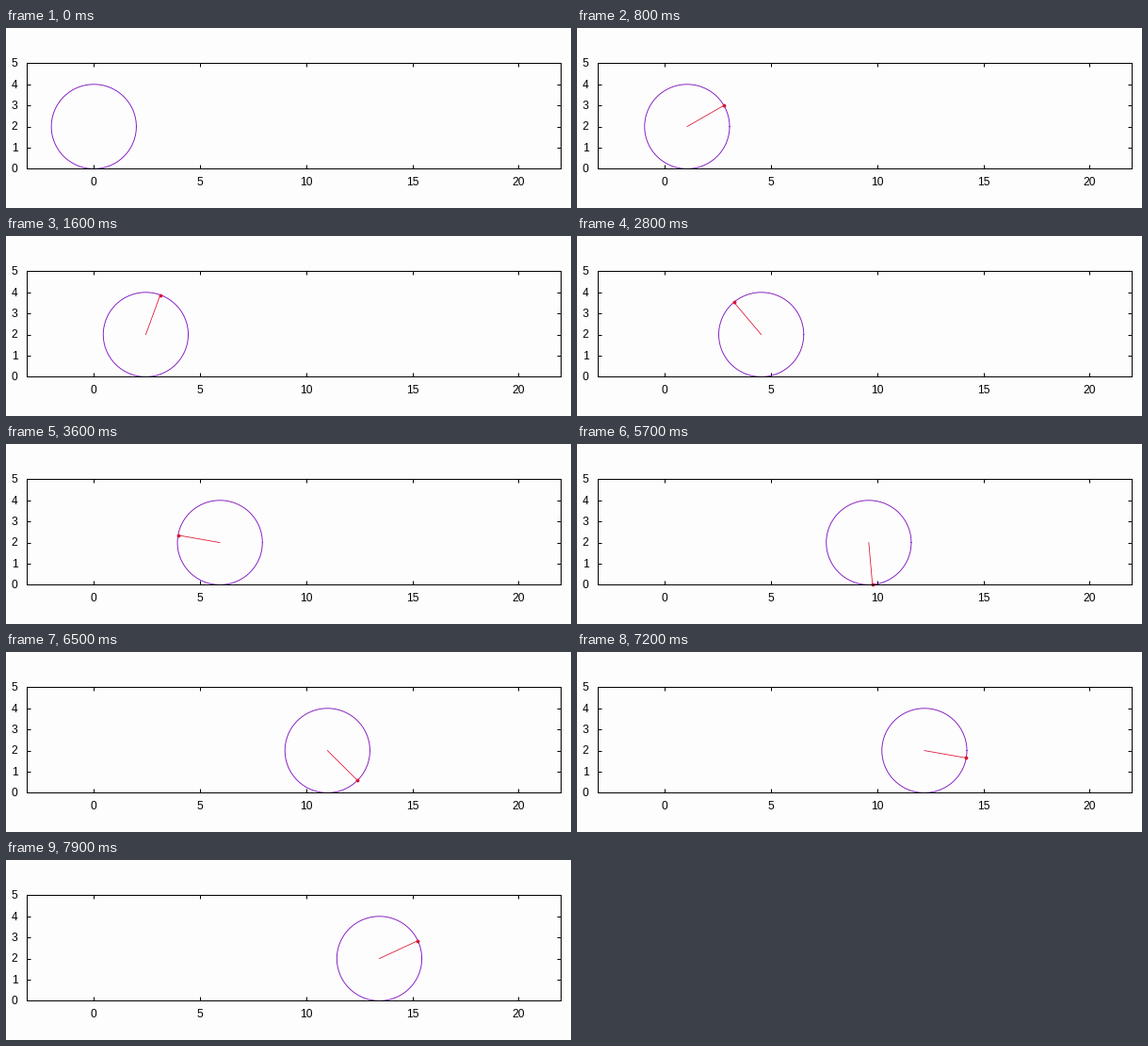
These frames come from a looping animation (600x191 px, 8000 ms). A matplotlib script:

```python
import numpy as np
import matplotlib.pyplot as plt
from matplotlib.animation import FuncAnimation
from matplotlib.transforms import ScaledTranslation

W, H, DPI = 600, 191, 100
PX = 72 / DPI                # one pixel in points
R = 2                        # wheel radius
STEP = np.radians(5)         # turn per frame
FRAMES = 80
PURPLE, RED = "#7d14bd", "#dc1432"

plt.rcParams["font.family"] = "Liberation Sans"
plt.rcParams["font.size"] = 12 * PX

fig = plt.figure(figsize=(W / DPI, H / DPI), dpi=DPI, facecolor="#fefdfe")
ax = fig.add_axes([22.4 / W, 41.6 / H, 567 / W, 112 / H], facecolor="none")
ax.set(xlim=(-np.pi, 7 * np.pi), ylim=(0, 5),
       xticks=range(0, 21, 5), yticks=range(6))
ax.tick_params(direction="in", top=True, right=True, length=4 * PX, width=PX)
ax.tick_params(axis="x", pad=8.6 * PX)
ax.tick_params(axis="y", pad=9.8 * PX)
for spine in ax.spines.values():
    spine.set_linewidth(PX)

lift = ScaledTranslation(0, 0.7 / DPI, fig.dpi_scale_trans)
for label in ax.get_yticklabels():
    label.set_transform(label.get_transform() + lift)

wheel, = ax.plot([], [], color=PURPLE, lw=0.9 * PX, clip_on=False)
spoke, = ax.plot([], [], color=RED, lw=0.8 * PX, clip_on=False)
dot, = ax.plot([], [], "o", color=RED, ms=3.8 * PX, mew=0, clip_on=False)

turn = np.linspace(0, 2 * np.pi, 100)
rim_x, rim_y = R * np.cos(turn), R + R * np.sin(turn)


def draw(i):
    # the wheel, spoke and dot appear one by one, then it rolls
    a = STEP * max(i - 2, 0)
    cx = R * a
    px, py = cx + R * np.cos(a), R + R * np.sin(a)
    wheel.set_data(cx + rim_x, rim_y)
    spoke.set_data([cx, px], [R, py])
    dot.set_data([px], [py])
    spoke.set_visible(i >= 1)
    dot.set_visible(i >= 2)
    return wheel, spoke, dot


anim = FuncAnimation(fig, draw, frames=FRAMES, interval=100, repeat=True,
                     repeat_delay=0)
plt.show()
```
